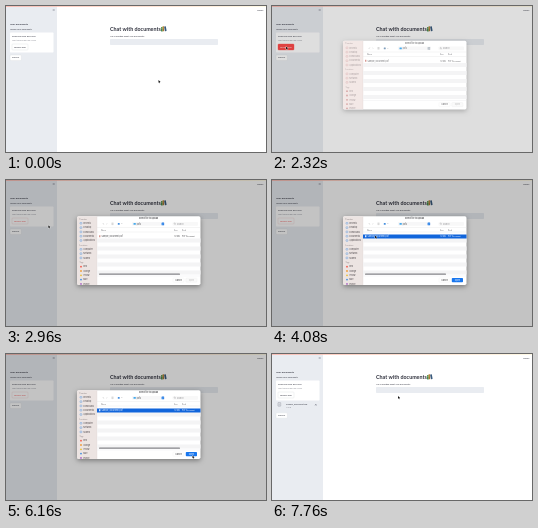
An HTML page with a canvas for the animation above (8000 ms loop, 260 by 146 pixels).

```html
<!DOCTYPE html>
<html lang="en">
<head>
<meta charset="utf-8">
<title>Chat with documents</title>
<style>
html, body { margin: 0; width: 100%; height: 100%; overflow: hidden; background: #fff; }
canvas { display: block; width: 100vw; height: 100vh; }
</style>
</head>
<body>
<canvas id="stage"></canvas>
<script>
const W = 260, H = 146, LOOP = 8000;
const canvas = document.getElementById('stage');
const ctx = canvas.getContext('2d');
const SANS = 'Lato, "Open Sans", sans-serif';
const UI = 'Inter, Roboto, sans-serif';
const INK = '#31333f';

const OPEN = 1920, ACTIVE = 2640, PICK = 3440, SUBMIT = 7200, GONE = 7440;

// time, x, y of the pointer
const path = [
  [0, 152.5, 74], [80, 152.5, 74], [400, 126, 50], [540, 126, 50],
  [740, 54, 39], [1040, 50, 38.5], [1440, .5, 37.5], [1540, .5, 37.5],
  [1800, 14, 40.5], [2720, 14, 40.5], [3360, 103, 55.5], [4560, 103, 55.5],
  [5760, 186.5, 101.5], [6240, 186.5, 101.5], [6800, 186, 100],
  [7280, 186, 100], [7700, 126, 42], [8000, 126, 42]
];

const clamp = v => Math.min(1, Math.max(0, v));

function pointer(t) {
  let i = 1;
  while (i < path.length - 1 && t > path[i][0]) i++;
  const [t0, x0, y0] = path[i - 1], [t1, x1, y1] = path[i];
  const p = clamp((t - t0) / (t1 - t0));
  const e = p * p * (3 - 2 * p);
  return [x0 + (x1 - x0) * e, y0 + (y1 - y0) * e];
}

function rect(x, y, w, h, fill, r = 0, stroke) {
  ctx.beginPath();
  ctx.roundRect(x, y, w, h, r);
  if (fill) { ctx.fillStyle = fill; ctx.fill(); }
  if (stroke) { ctx.strokeStyle = stroke; ctx.lineWidth = .35; ctx.stroke(); }
}

function text(s, x, y, size, color = INK, weight = 400, family = SANS, align = 'left') {
  ctx.font = `${weight} ${size}px ${family}`;
  ctx.textAlign = align;
  ctx.textBaseline = 'alphabetic';
  ctx.fillStyle = color;
  ctx.fillText(s, x, y);
}

function line(color, width, ...pts) {
  ctx.beginPath();
  for (let i = 0; i < pts.length; i += 2) ctx.lineTo(pts[i], pts[i + 1]);
  ctx.strokeStyle = color;
  ctx.lineWidth = width;
  ctx.stroke();
}

function dot(x, y, r, color) {
  ctx.beginPath();
  ctx.arc(x, y, r, 0, 7);
  ctx.fillStyle = color;
  ctx.fill();
}

function cross(x, y, r, color) {
  line(color, .45, x - r, y - r, x + r, y + r);
  line(color, .45, x + r, y - r, x - r, y + r);
}

function books(x, y) {
  rect(x, y + .8, 1.7, 4.5, '#3f8f4f', .3);
  rect(x + 1.5, y + .2, 1.6, 5, '#b9873c', .3);
  ctx.save();
  ctx.translate(x + 3.1, y + .5);
  ctx.rotate(-.18);
  rect(0, 0, 1.7, 4.7, '#38597c', .3);
  ctx.restore();
  rect(x + .4, y + 1.7, 1, .6, '#e2d28a');
  rect(x + 1.8, y + 3.7, 1, .5, '#563a28');
}

function page(t) {
  rect(0, 0, W, H, '#fff');
  rect(0, 0, 51, H, '#e9ecf1');
  const g = ctx.createLinearGradient(0, 0, W, 0);
  g.addColorStop(0, '#ffb0a4');
  g.addColorStop(1, '#fff8dc');
  rect(0, 0, W, .8, g);
  cross(47.7, 4, .7, '#555867');
  text('Deploy', 257.5, 4.7, 2, INK, 400, SANS, 'right');

  text('Your documents', 4, 18.7, 2.5, INK, 700);
  text('Upload your documents', 4, 24.4, 2.1);
  rect(4, 26.5, 43.5, 20, '#fff', .8);
  text('Drag and drop files here', 6, 31.3, 2.25);
  text('Limit 200MB per file • PDF', 6, 35.1, 2, '#8b8d96');

  const pressed = t >= OPEN && t < 2760, focus = t >= 2760 && t < GONE;
  rect(6, 38, 16, 6, pressed ? '#ff4b4b' : '#fff', .8, pressed ? '#ff4b4b' : focus ? '#f0c4c4' : '#d9dbe0');
  text('Browse files', 14, 41.8, 2.2, pressed ? '#fff' : focus ? '#f05a5a' : INK, 400, SANS, 'center');

  const loaded = t >= GONE;
  if (loaded) {
    rect(6, 48.6, 2.7, 3.6, null, .3, '#747783');
    line('#747783', .3, 6.7, 50, 8, 50);
    line('#747783', .3, 6.7, 51, 8, 51);
    text('Sample_document.pdf', 14, 50.9, 2.2);
    text('1.2MB', 14, 53.6, 1.7, '#8b8d96');
    cross(43.8, 50.8, .7, '#555867');
  }
  const y = loaded ? 58.8 : 49;
  rect(4, y, 11.3, 5.4, '#fff', .8, '#d9dbe0');
  text('Process', 9.65, y + 3.4, 2.15, INK, 400, SANS, 'center');

  text('Chat with documents', 104, 24.9, 5.35, INK, 700);
  books(155, 20.1);
  text('Ask a question about your documents:', 104, 31.1, 2.05);
  rect(104, 33, 108, 6, '#e9ecf1', .8);
}

function sideList(on) {
  const ink = on ? '#443f42' : '#a59b9c';
  const head = on ? '#958b8d' : '#b5a9aa';
  const icon = on ? '#2f83dc' : '#d7a6a5';
  const group = (title, y, items, tag) => {
    text(title, 73.5, y + .7, 1.7, head, 600, UI);
    items.forEach((s, i) => {
      const iy = y + 4.3 * (i + 1);
      if (tag) dot(75, iy, .9, on ? tag[i] : icon);
      else rect(74, iy - .8, 1.9, 1.6, null, .3, icon);
      text(s, 77.3, iy + .75, 2, ink, 400, UI);
    });
  };
  group('Favorites', 39, ['Recents', 'Desktop', 'Downloads', 'Documents', 'Applications']);
  group('Locations', 65, ['Computer', 'Network', 'Shared']);
  group('Tags', 82.4, ['Red', 'Orange', 'Yellow', 'Blue', 'Purple'],
    ['#f25a4b', '#f19a35', '#e9bd37', '#408fe0', '#aa68c4']);
}

function dialog(t) {
  const on = t >= ACTIVE && t < SUBMIT, picked = t >= PICK;
  const ink = on ? '#454548' : '#6a6a6d';
  const unit = ctx.getTransform().a;

  ctx.save();
  ctx.translate(0, on ? 0 : picked ? -.7 : -1.5);

  ctx.save();
  ctx.shadowColor = `rgba(0,0,0,${on ? .4 : .25})`;
  ctx.shadowBlur = 5 * unit;
  ctx.shadowOffsetY = 1.5 * unit;
  rect(71, 36.2, 123.5, 68.8, '#fff', 1.7);
  ctx.restore();

  ctx.beginPath();
  ctx.roundRect(71, 36.2, 123.5, 68.8, 1.7);
  ctx.clip();
  rect(71, 36, 20, 69, on ? '#ece4e2' : '#f3e8e6');
  sideList(on);
  line('#d8d0cf', .3, 91, 36, 91, 105);

  text('Select file to upload', 142.5, 39, 2, ink, 600, UI, 'center');
  line('#aaa', .4, 97.8, 43, 97, 43.8, 97.8, 44.6);
  line('#ccc', .4, 100.4, 43, 101.2, 43.8, 100.4, 44.6);
  for (let i = 0; i < 3; i++) line('#888', .3, 105.5, 43 + i * .8, 107.5, 43 + i * .8);
  rect(111.8, 42.9, 1.9, 1.8, on ? '#4790df' : '#7e9dbb', .3);
  text('⌄', 115, 44.4, 2, ink, 400, UI);
  rect(126, 42, 33, 3.7, '#f7f7f8', .7);
  rect(127.5, 43, 2.3, 1.7, '#45a9ec', .3);
  text('pdfs', 130.8, 44.6, 2, ink, 400, UI);
  rect(155.6, 42.5, 2.5, 2.8, on ? '#1876e5' : '#b4bcc5', .5);
  line('#fff', .3, 156.2, 43.6, 156.85, 43, 157.5, 43.6);
  line('#fff', .3, 156.2, 44.2, 156.85, 44.8, 157.5, 44.2);
  rect(166.5, 42, 25.5, 3.7, '#f8f8f8', .7);
  ctx.beginPath();
  ctx.arc(168.7, 43.6, .65, 0, 7);
  ctx.strokeStyle = '#88888c';
  ctx.lineWidth = .3;
  ctx.stroke();
  line('#88888c', .3, 169.2, 44.1, 169.8, 44.7);
  text('Search', 171, 44.6, 2, '#8d8d91', 400, UI);

  line('#dcdcde', .3, 91, 47.5, 195, 47.5);
  text('Name', 95, 50.7, 1.8, '#77777b', 400, UI);
  text('Size', 168, 50.7, 1.8, '#77777b', 400, UI);
  text('Kind', 176, 50.7, 1.8, '#77777b', 400, UI);
  line('#dcdcde', .3, 91, 52, 195, 52);
  for (let y = 58.4; y < 92; y += 8) rect(91, y, 104, 4, '#f4f4f5');
  if (picked) rect(91, 54.4, 104, 4, on ? '#1165db' : '#d4d4d6');
  const row = picked && on ? '#fff' : ink;
  rect(93, 55.3, 1.4, 2, picked && on ? '#dceaff' : '#d99a93', .2);
  text('Sample_document.pdf', 95.5, 57, 2, row, 400, UI);
  text('1.2 MB', 168, 57, 1.8, row, 400, UI);
  text('PDF Document', 176, 57, 1.8, row, 400, UI);

  if (t >= ACTIVE) rect(93, 93.6, 81, 1.1, '#858589', .55);
  line('#e4e4e6', .3, 91, 96, 195, 96);
  rect(167, 98, 11, 4.2, '#fff', .8, '#ececee');
  text('Cancel', 172.5, 100.8, 2, ink, 500, UI, 'center');
  const ready = picked && on;
  rect(179.8, 98, 11.2, 4.2, ready ? '#1876ee' : '#fafafa', .8, ready ? null : '#ececee');
  text('Open', 185.4, 100.8, 2, ready ? '#fff' : picked ? '#555' : '#bbb', 500, UI, 'center');
  ctx.restore();
}

function arrow(x, y) {
  ctx.beginPath();
  [[0, 0], [0, 2.8], [.7, 2.2], [1.15, 3.2], [1.65, 3], [1.2, 2], [2.1, 2]]
    .forEach(([dx, dy]) => ctx.lineTo(x + dx, y + dy));
  ctx.closePath();
  ctx.lineWidth = .6;
  ctx.strokeStyle = '#fff';
  ctx.stroke();
  ctx.fillStyle = '#111';
  ctx.fill();
}

function draw(t) {
  const w = Math.round(innerWidth * devicePixelRatio), h = Math.round(innerHeight * devicePixelRatio);
  if (canvas.width !== w || canvas.height !== h) { canvas.width = w; canvas.height = h; }
  ctx.setTransform(w / W, 0, 0, h / H, 0, 0);
  page(t);
  if (t >= OPEN && t < GONE) {
    const enter = clamp((t - OPEN + 60) / 180);
    const dim = t < ACTIVE ? .13 : t < SUBMIT ? .235 : .165;
    rect(0, 0, W, H, `rgba(0,0,0,${dim * Math.min(enter, clamp((GONE - t) / 120))})`);
    ctx.globalAlpha = Math.min(enter, clamp((GONE - t) / (GONE - SUBMIT + 60)));
    if (t < SUBMIT) ctx.globalAlpha = enter;
    dialog(t);
    ctx.globalAlpha = 1;
  }
  arrow(...pointer(t));
}

const start = performance.now();
function tick() {
  draw((performance.now() - start) % LOOP);
  requestAnimationFrame(tick);
}
tick();
</script>
</body>
</html>
```
